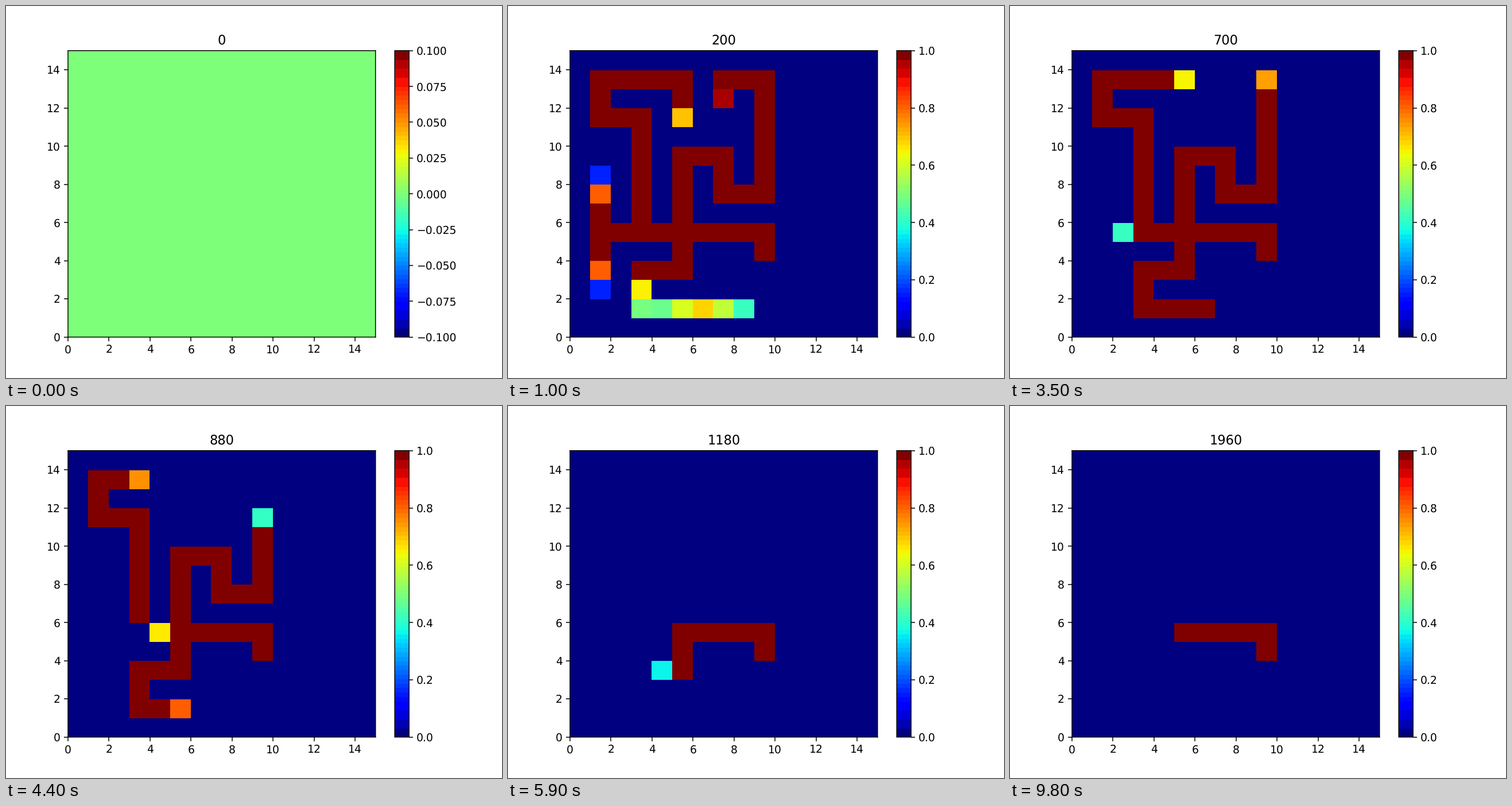
Animation of 864x648 px, one loop 9.9 s. Source, as a matplotlib script:

```python
import numpy as np
import matplotlib.pyplot as plt
from matplotlib.animation import FuncAnimation
from matplotlib.cm import ScalarMappable
from matplotlib.colors import ListedColormap, Normalize

SIZE = 15
FRAMES = 99
STEPS_PER_FRAME = 20
FAINT = 0.105  # weaker cells count as empty

plt.rcParams["path.snap"] = False
plt.rcParams["text.hinting"] = "none"


def walk(*corners):
    """List every cell along a path given by its corner cells."""
    cells = [corners[0]]
    for x1, y1 in corners[1:]:
        x, y = cells[-1]
        dx, dy = np.sign(x1 - x), np.sign(y1 - y)
        while (x, y) != (x1, y1):
            x, y = x + dx, y + dy
            cells.append((x, y))
    return cells


# Ways in which the front of a dying arm moves along its cells.
def steady(rate, start):
    return lambda n: rate * (n - start)


def collapse(gain, end, offset):
    return lambda n: gain / np.sqrt(max(end - n, 0.01)) - offset


def growing(base, at, scale):
    return lambda n: base * np.exp((n - at) / scale)


CORE = walk((5, 5), (9, 5), (9, 4))
BOTTOM = walk((8, 1), (3, 1), (3, 3), (5, 3), (5, 4))

# Cells from the tip inwards, sharpness of the front, motion of the front.
ARMS = [
    (walk((5, 11), (5, 13), (1, 13), (1, 11), (3, 11), (3, 6)),
     0.65, collapse(34, 59, 4.94)),
    (walk((7, 12), (7, 13), (9, 13), (9, 7), (7, 7), (7, 9), (5, 9), (5, 6)),
     0.65, collapse(69.42, 64.8, 9.857)),
    (BOTTOM, 1.4, growing(1.95, 35, 16)),
    (walk((1, 2), (1, 5)), 0.65, steady(0.36, 7.9)),
    (walk((1, 8), (1, 5)), 0.65, steady(0.36, 7.9)),
    (walk((2, 5), (4, 5)), 0.65, steady(0.18, 33)),
]


def late_growth(k, n):
    """Strength of the k-th bottom cell, which fills up in a wavy way."""
    level = 0.57 + 0.015 * (k - 3) + 0.13 * np.cos(2 * np.pi * (k - 2) / 5)
    return min(1, level * (n / 10) ** 1.3)


def field(n):
    grid = np.zeros((SIZE, SIZE))
    if n == 0:
        return grid
    for x, y in CORE:
        grid[y, x] = 1
    for cells, sharpness, front in ARMS:
        for k, (x, y) in enumerate(cells, 1):
            value = np.clip(sharpness * (k - front(n)), 0, 1)
            grid[y, x] = value if value > FAINT else 0
    for k, (x, y) in enumerate(BOTTOM[:7]):
        grid[y, x] = min(grid[y, x], late_growth(k, n))
    return grid


def banded_jet():
    """Jet in visible bands, twice as wide near both ends."""
    jet = plt.get_cmap("jet")
    edges = np.r_[0:8:2, 8:56, 56:65:2]
    mids = (edges[:-1] + edges[1:]) / 128
    mids[0], mids[-1] = 0, 1
    return ListedColormap(np.repeat(jet(mids), np.diff(edges) * 4, axis=0))


fig, ax = plt.subplots(figsize=(6.4, 4.8), dpi=135)
mesh = ax.pcolormesh(field(0), cmap="jet", vmin=-0.1, vmax=0.1)
scale = ScalarMappable(Normalize(-0.1, 0.1), banded_jet())
bar = fig.colorbar(scale, ax=ax)
title = ax.set_title("0")


def update(n):
    limits = (0, 1) if n else (-0.1, 0.1)
    mesh.set_array(field(n))
    mesh.set_clim(*limits)
    if scale.get_clim() != limits:
        scale.set_clim(*limits)
    title.set_text(str(n * STEPS_PER_FRAME))
    return mesh, title


anim = FuncAnimation(fig, update, frames=FRAMES, interval=100, repeat=True,
                     repeat_delay=0, blit=False)
plt.show()
```
